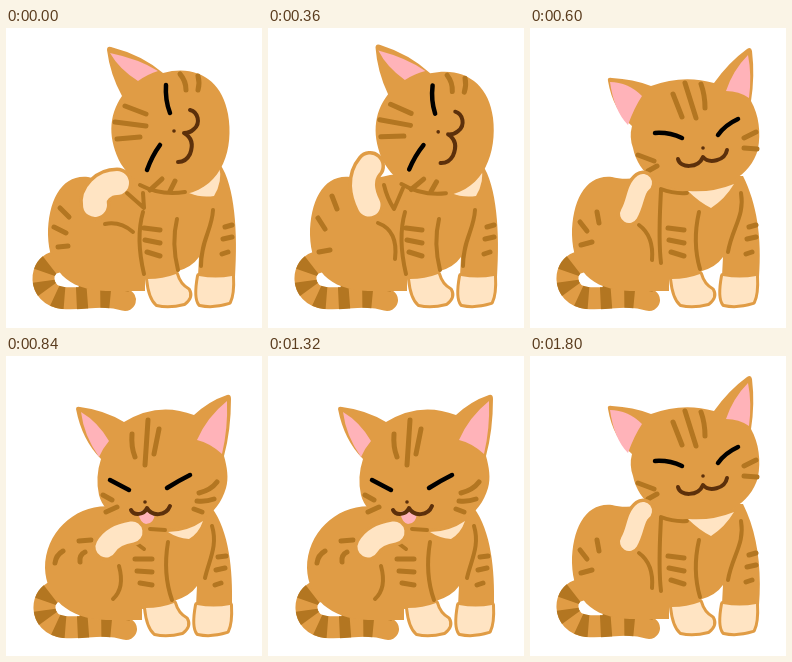
An HTML page that plays this animation: 256x300 px, repeating every 1.92 s.

```html
<!DOCTYPE html>
<html lang="en">
<head>
<meta charset="utf-8">
<title>Grooming cat</title>
<style>
html, body { margin: 0; width: 100%; height: 100%; overflow: hidden; background: #fff; }
svg { display: block; width: 100vw; height: 100vh; }
path { stroke-linecap: round; stroke-linejoin: round; }
</style>
</head>
<body>
<svg id="stage" viewBox="0 0 256 300"></svg>
<script>
const FUR = '#e09c45', STRIPE = '#b37621', CREAM = '#ffe4c3', PINK = '#ffb3b9', MOUTH = '#5c300b';
const STEP = 120;

const fill = (d, c, extra = '') => `<path d="${d}" fill="${c}" ${extra}/>`;
const line = (d, w = 4, c = STRIPE, extra = '') =>
  `<path d="${d}" fill="none" stroke="${c}" stroke-width="${w}" ${extra}/>`;
const rimmed = d => fill(d, CREAM, `stroke="${FUR}" stroke-width="6" paint-order="stroke"`);
const limb = (d, w) => line(d, w + 7, FUR) + line(d, w, CREAM);
const dot = (x, y, r = 1.8) => `<circle cx="${x}" cy="${y}" r="${r}" fill="${MOUTH}"/>`;
const group = (s, t) => `<g transform="${t}">${s}</g>`;

function tail(dx, dy) {
  const d = 'M51 234C33 236 31 267 57 270C77 272 95 265 119 272';
  return group(line(d, 22, FUR) +
    line(d, 22, STRIPE, 'style="stroke-linecap:butt" stroke-dasharray="0 8 9 9 9 10 10 12 11 13 10 99"') +
    line('M74 259Q96 257 122 262', 3), `translate(${dx} ${dy})`);
}

const paws = rimmed('M142 251Q157 251 170 246Q173 257 182 262Q186 269 178 275Q163 279 151 276Q144 270 142 251Z') +
  rimmed('M193 248Q210 251 226 248Q227 266 223 274Q207 279 194 276Q189 270 193 248Z');

const torso = right => fill(
  'M122 147C108 151 92 152 82 149C56 146 42 172 42 207C43 241 60 262 100 263L139 263L139 251' +
  `Q158 250 172 243Q186 239 193 229L192 248Q211 252 229 249${right}Z`, FUR);

// Sideways head used while scratching
const tilted =
  fill('M101 22Q101 18 105 19Q136 27 157 45C190 36 216 52 222 86C228 120 217 158 180 166' +
    'C152 169 128 156 115 136C102 112 102 88 116 68Q104 46 101 22Z', FUR) +
  fill('M104 25Q133 31 152 43Q142 46 132 53Q113 41 104 25Z', PINK) +
  line('M119 78L140 86M109 94L140 98M111 111L134 109M174 46Q180 53 180 62M192 48Q194 55 192 62' +
    'M144 162L156 151M164 163L169 153', 5) +
  line('M134 157Q155 168 179 164') +
  line('M160 57Q159 72 164 85M154 117Q146 128 141 142', 4.5, '#000') +
  line('M184 82C192 84 195 95 188 101Q184 105 178 105C187 110 187 118 184 126Q180 134 172 134', 4, MOUTH) +
  dot(168, 103);

const upright =
  fill('M78 53Q77 49 82 50Q103 51 121 58Q153 46 184 55Q199 34 217 21Q221 18 222 23' +
    'Q225 48 221 73C229 87 231 105 228 121C221 148 192 163 164 163C132 163 108 146 103 120' +
    'Q99 109 102 98Q83 82 78 53Z', FUR) +
  fill('M80 54Q98 54 112 68Q104 80 98 97Q84 83 80 54Z', PINK) +
  fill('M218 27Q222 47 219 70Q209 63 196 63Q203 42 218 27Z', PINK) +
  line('M143 66L152 89M155 55L166 90M171 56Q175 67 175 80M108 127L124 133M118 143L127 138' +
    'M214 110L226 104M214 120L227 121', 5) +
  line('M125 105Q139 104 152 110M188 107Q195 97 208 91', 4.5, '#000') +
  line('M148 131C150 140 168 141 173 129C179 136 195 133 197 122', 4, MOUTH) +
  dot(173, 120);

const licking = tongue =>
  fill('M70 53Q70 50 74 51Q98 54 118 66Q152 45 188 59Q203 45 221 39Q225 38 225 43' +
    'Q225 74 218 100C221 111 223 122 220 132C212 160 187 173 159 173C126 173 98 160 93 139' +
    'Q89 121 95 103Q76 84 70 53Z', FUR) +
  fill('M75 56Q92 66 103 85Q97 92 93 101Q78 80 75 56Z', PINK) +
  fill('M221 45Q222 73 216 98Q204 87 191 84Q201 61 221 45Z', PINK) +
  line('M126 78Q125 91 129 101M142 64L139 109M153 73L148 98M97 139L106 144M100 156L111 151' +
    'M193 137Q205 134 211 126M191 145Q200 146 208 143M188 153L196 156', 5) +
  line('M104 124L123 134M161 132Q172 125 184 119', 4.5, '#000') +
  fill(`M132 156Q140 152 149 157Q148 ${tongue} 140 ${tongue}Q134 ${tongue - 1} 132 156Z`, PINK) +
  line('M125 154C128 160 138 159 141 152C146 161 160 160 164 150', 4, MOUTH) +
  dot(139, 146);

const chestBars = line('M138 200L154 202M139 212L154 215M141 224L154 228', 5);
const sideBars = line('M219 199L226 197M217 211L226 209M216 226L222 224', 5);

function scratch(swing) {
  const low = swing === 0;
  const arm = low
    ? limb('M111 155C98 155 87 166 89 177', 24)
    : limb('M102 138C92 150 95 165 101 177', 23);
  const marks = low
    ? line('M54 180L63 189M48 199L60 205M52 219L62 218', 5) +
      line('M99 196Q114 193 127 204M121 165L138 180L137 165')
    : line('M64 168L69 181M50 190L57 201M51 224L62 222', 5) +
      line('M110 195C126 201 129 215 127 231M116 157Q119 170 126 181L135 160');
  return tail(0, 0) + torso('C232 205 229 158 214 136') + paws +
    fill('M183 165L213 138Q217 153 208 168Q195 170 183 165Z', CREAM) +
    chestBars + sideBars +
    line('M137 184C131 205 134 229 138 246M171 191C166 212 169 230 172 242M207 182C206 202 195 212 195 238') +
    group(tilted, `rotate(${swing} 153 145)`) + arm + marks;
}

function sit() {
  return tail(0, 0) + torso('C232 210 227 176 213 148') + paws +
    line('M67 184L69 195M50 194L57 203M51 217L62 214', 5) +
    chestBars + sideBars +
    line('M109 197Q124 208 122 232M131 162C130 184 128 210 131 235M169 184C164 206 165 224 170 241' +
      'M211 165C215 188 202 200 198 224') +
    upright +
    limb('M113 155C105 161 106 174 99 186', 18) +
    line('M131 161Q144 166 157 165') +
    fill('M158 163Q182 165 204 156Q195 171 181 180Q169 174 158 163Z', CREAM);
}

function lick(tilt, lift, reach) {
  return tail(1, 1) +
    fill('M110 151C73 145 39 174 39 212C40 242 62 263 100 264L136 264L136 253' +
      'Q154 252 168 245Q184 240 191 230L190 250Q210 254 226 250C227 214 223 175 206 152Z', FUR) +
    group(paws, 'translate(-2 1)') +
    line('M49 207Q50 199 57 195M73 185L85 184M74 206Q73 199 79 196', 5) +
    line('M129 203L146 203M131 215L146 216M134 227L146 229M212 201L220 200M210 214L219 212M209 229L215 227', 5) +
    line('M113 210Q119 232 107 243M162 186C158 210 161 230 166 244M206 170C212 190 203 204 199 222M126 184L138 193') +
    group(licking(168 + reach), `translate(0 ${-lift}) rotate(${tilt} 160 165)`) +
    group(limb('M126 176C113 178 104 184 100 191', 21), `translate(0 ${reach})`) +
    line('M144 173L159 174') +
    fill('M162 176Q181 176 197 165Q193 177 183 183Q171 182 162 176Z', CREAM);
}

const poses = { a: scratch(0), b: scratch(3), c: sit(), d: lick(0, 0, 0), e: lick(1.5, 3, 2) };
const order = 'ababacededededec';

const stage = document.getElementById('stage');
stage.innerHTML = Object.entries(poses)
  .map(([k, s]) => `<g id="${k}" display="none">${s}</g>`).join('');
let shown = null;

function draw(ms) {
  const next = document.getElementById(order[Math.floor(ms / STEP) % order.length]);
  if (next === shown) return;
  if (shown) shown.setAttribute('display', 'none');
  next.setAttribute('display', 'inline');
  shown = next;
}

const start = performance.now();
function tick() {
  draw(performance.now() - start);
  requestAnimationFrame(tick);
}
draw(0);
requestAnimationFrame(tick);
</script>
</body>
</html>
```
